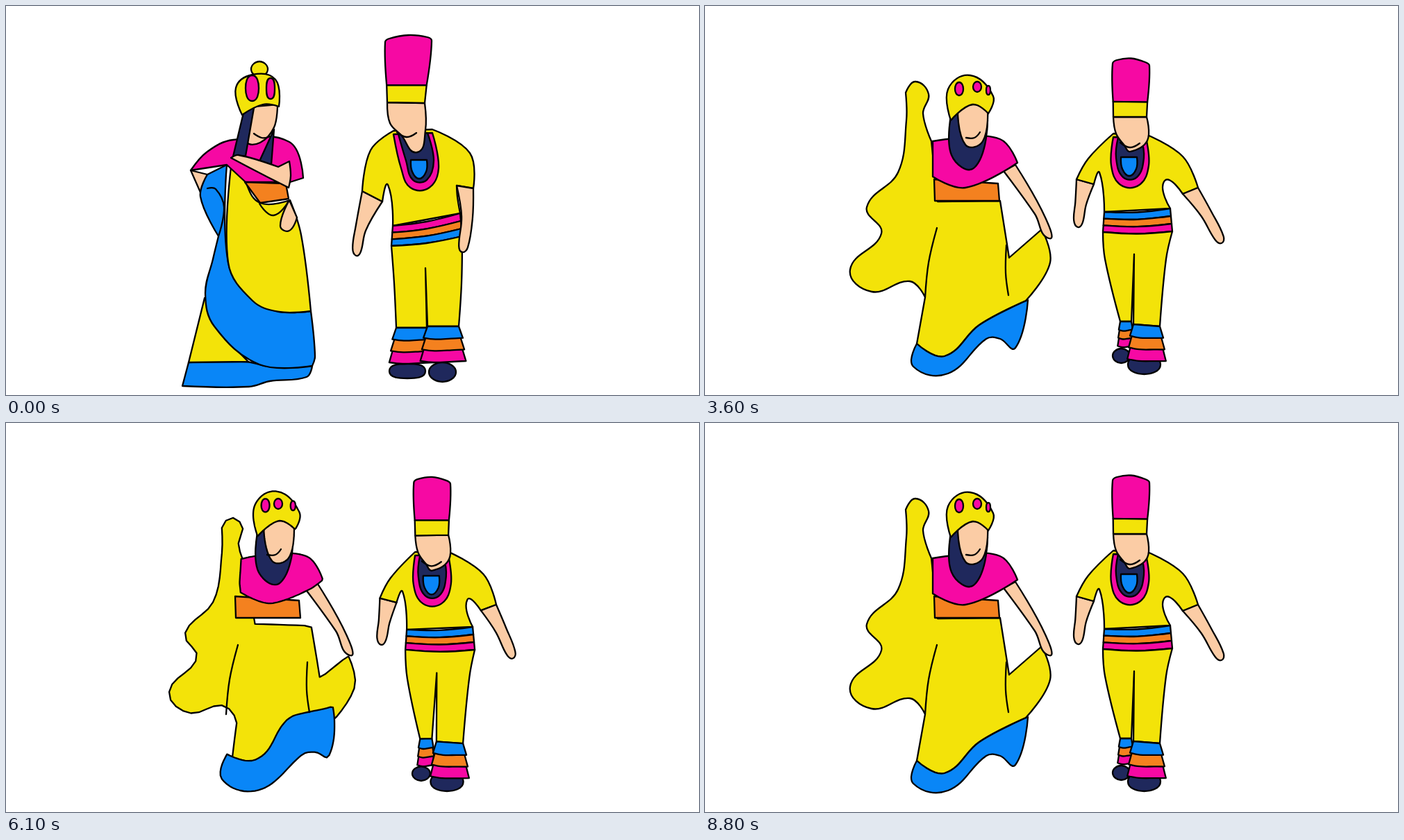
An HTML page that plays this animation: 998 by 561 pixels, repeating every 8900 ms.

```html
<!DOCTYPE html>
<html lang="en">
<head>
<meta charset="utf-8">
<title>Dancing couple</title>
<style>
html, body { margin: 0; width: 100%; height: 100%; overflow: hidden; background: #fff; }
svg { display: block; width: 100%; height: 100%; }
path { stroke: #000; stroke-width: 2.3; stroke-linejoin: round; stroke-linecap: round; }
</style>
</head>
<body>
<svg id="stage" viewBox="0 0 998 561"></svg>
<script>
// Gown parts: colour, then points. "x,y" is smooth, "x/y" a corner, two points span an oval.
const stand = {
  armL: 's 266/237 290/243 281/271',
  b2: 'b 263/514 345,513 380,520 441/519 433,535 380,541 350,549 254/548',
  y2: 'y 286/421 263/514 349/513 320,480',
  b1: 'b 318/229 320,370 355,424 395,441 439/440 445,505 441/519 365,517 300,462 287,415 298,365 306/332 280,275 290/243',
  fold: 'l 290,263 302,264 314,290 306,332',
  y1: 'y 326/217 343/229 345,253 366,284 409/280 425,330 439/440 393,441 355,425 320,370',
  shirt: 'm 266/237 290,210 327,193 408,196 428/248 409/254 345/254 318/229',
  belt: 'o 344/254 366/284 407/278 403/256',
  bow: 'l 365,285 385,302 406,283',
  face: 's 357/145 347,195 366,197 386,175 391/142',
  hair: 'n 343/150 327/217 345/216 357/147',
  lock: 'n 386/178 364/226 382/229',
  smile: 'l 357,184 368,190 378,189',
  ball: 'y 353,80 377,102',
  crown: 'y 340/157 331,118 355,99 388,106 393/145 370,142',
  winL: 'm 345,100 364,137',
  winR: 'm 375,104 387,134',
  hand: 's 408/280 395,317 408,324 419/305',
  arm: 's 324/219 335,215 392/232 408/224 410,245 407/262 360,238'
};
const swing = {
  legL: 's 328/462 322,525 290/557 330,550 345,500 357/468',
  legR: 's 388/497 374,548 398,552 407/505',
  b1: 'b 245/135 280,116 315,140 346/198 350/262 367/474 325,462 260,414 240,380 255,310 290,225 280,170',
  b2: 'b 543/345 554,410 530,515 445,541 405/508',
  y1: 'y 350/260 312,275 302,340 352,432 368,475 420,508 510,483 543,400 538/327 500,352 455/282 405,290',
  belt: 'o 346/247 400,255 449/245 452/280 400,291 370/284',
  shirt: 'm 346/198 380,181 440,181 483/204 455/243 390,256 347/247',
  hair: 'n 383/137 368,195 400,227 430,205 432/172 416,180 410,203 388,203 388/150',
  face: 's 390/128 440/124 433,170 415/180 414,192 384/190',
  smile: 'l 400,165 412,173 422,177',
  ball: 'y 395,60 419,84',
  crown: 'y 381/138 370,103 400,76 435,84 440/130 405,124',
  winL: 'm 387,82 406,108',
  winR: 'm 419,80 433,109',
  arm: 's 469/210 505,258 540,318 533,328 490,275 458/238'
};
const turn = {
  legL: 's 363/502 375,528 393,532 397/512',
  armL: 's 345/253 368/262 345,290 325,320 320,285',
  belt: 'o 369/258 386/258 388/278 370/275',
  b2: 'b 450/404 517,455 466/530 445,548 400,555 388,540 399/512 450,520 464,460',
  face: 's 400/146 460/148 455/178 393/170',
  shirt: 'm 384/180 355,205 340,243 390/263',
  sleeve: 'm 427/172 440,160 457/186 480,190 495/220 465/229',
  arm: 's 465/229 495/218 498,246 465/247',
  y1: 'y 427/172 460,200 466,280 503/358 505/432 452/404 465,470 440,523 345,495 320,525 262,495 265,437 290,388 320/370 352/288 385/278',
  fold: 'l 433,300 455,325 503,358',
  b1: 'b 382/170 405,156 427/170 415,260 430,355 505/432 450,404 405,340 385,240',
  b3: 'b 354/287 320,365 338,440 418/485 400,445 345,380 342,315',
  ball: 'y 436,62 458,83',
  crown: 'y 400/148 402,100 425,79 468,90 459/149 430,146',
  winL: 'm 407,90 416,112',
  winM: 'm 426,86 448,115',
  winR: 'm 459,95 468,118'
};
const sweep = {
  y1: 'y 360/231 330,250 314,360 289,430 340,462 360,530 405/550 510,555 545,525 530/423 551/417 538,375 540/346 508/336 495/291 395,275',
  gap: 'w 363/256 388/250 388/273 370/287',
  fold: 'l 361,235 368,300 372,382',
  b1: 'b 397/325 435,318 485,375 510,388 545/390 552/417 528/424 480,385 430,328',
  b2: 'b 402/385 435,430 536/478 545,530 510,556 408/550 480,538 519,515 490,475 430,450',
  hem: 'l 402,387 396,340 415,314 470,324 540,346',
  armL: 's 362/235 386/245 386/250 364/256',
  arm: 's 495/250 513/236 540,325 533,345 508,300',
  belt: 'o 391/255 490/255 494/290 440,286 388/273',
  shirt: 'm 425/182 380,202 365/232 450,258 521/231 485/185',
  face: 's 440/133 480/130 472,180 470,195 452/190',
  hair: 'n 430/137 423,182 465,236 482,180 474/168 468,212 447,175 438/133',
  smile: 'l 447,172 460,180 473,172',
  ball: 'y 440,61 461,80',
  crown: 'y 426/140 417,100 445,79 478,92 485/133 460,129',
  winL: 'm 429,91 438,116',
  winR: 'm 463,88 472,106',
  seam: 'l 654,367 665,410 667,460'
};
const wrap = {
  shirt: 'm 420/195 395/228 440/245 500/243 490,195',
  hair: 'n 421/145 417,195 440,213 462/180',
  face: 's 422/150 445,135 469/138 461,185 440,190',
  crown: 'y 421/152 414,115 445,89 478,125 475/143 450,135',
  winL: 'm 421,104 432,124',
  winR: 'm 443,95 458,113',
  y2: 'y 455/224 490,237 537/307 475,290',
  b1: 'b 316/368 318,285 365,235 425,232 475,295 450,365 392/440 380,417',
  y3: 'y 316/368 355,287 400,258 436,285 428,380 392/440 380,417',
  b2: 'b 433/232 447,219 485,290 545,312 590,380 575,465 515,518 430,518 388,460 450,365 476,310',
  y1: 'y 475/312 535,362 545,435 475,503 417,440 440,385'
};
const fling = {
  y1: 'y 289/125 303,109 322,127 314,155 326/195 335/282 425/281 438/363 485/322 497,370 462/425 395,460 345,505 305/487 317/420 295,397 240,412 209,380 254,328 233,290 278,240 290,165',
  b2: 'b 305/487 300,520 350,530 405,480 425,480 447,493 465/424 395,460 345,505',
  fold: 'l 334,320 322,370 317,420',
  hem: 'l 434,345 433,385 437,417',
  belt: 'o 330/250 422/256 424/281 331/281',
  arm: 's 430/238 447/229 490,305 495,335 475,300',
  shirt: 'm 328/195 360,191 425,192 450/226 375,262 328/246',
  hair: 'n 355/153 355,215 388,233 407/165',
  face: 's 364/148 385,142 407/147 400,195 375,200',
  smile: 'l 376,190 388,190 396,182',
  crown: 'y 354/165 350,120 382,100 415,130 408/155 385,142',
  winL: 'm 360,110 372,129',
  winM: 'm 386,109 398,124',
  winR: 'm 405,115 411,128'
};

// Joints of the man: head, sleeves, hands, hips and legs, shoes.
const joints = {
  stand: ['546,47 613,45 549,139 603,140 577,189 592,211 558,180 614,178 596,264',
    '525,208 513,267 542,282 550,258 668,212 673,263 649,259 650,275', '511,320 504,360 664,305 657,355',
    '557,317 654,299 559,400 656,400 604,378 562,464 606,464 607,462 652,462', '552,516 604,537 609,514 648,542'],
  swing: ['595,61 643,65 586,140 633,149 603,184 612,206 587,175 635,172 617,261',
    '548,210 533,249 552,264 567,257 695,205 720,246 697,254 667,243', '541,290 535,322 728,285 730,336',
    '570,303 669,292 571,365 675,370 620,380 585,459 616,458 626,458 671,459', '565,508 612,528 643,504 665,537'],
  turn: ['584,69 634,66 589,158 639,157 617,210 625,228 592,185 640,178 625,281',
    '555,235 537,272 563,282 580,258 700,205 727,246 702,257 677,240', '534,320 527,360 711,280 704,322',
    '583,307 680,297 590,375 684,370 632,360 598,462 633,462 637,460 657,460', '607,504 635,551 633,504 650,538'],
  sweep: ['600,95 655,97 605,186 653,185 630,226 645,247 605,203 655,190 645,300',
    '560,245 547,288 570,294 592,270 730,230 745,267 714,263 697,258', '557,335 561,377 714,295 709,336',
    '586,305 690,315 595,365 713,405 634,446 622,440 633,440 634,463 668,463', '615,468 638,497 651,512 683,556'],
  wrap: ['589,101 640,96 598,178 645,173 618,222 625,233 597,200 650,190 626,279',
    '565,250 562,271 580,272 592,263 684,225 678,262 655,266 680,275', '569,300 562,325 650,292 631,322',
    '592,303 687,308 590,390 690,380 636,377 584,460 609,456 640,461 680,463', '571,504 602,523 628,512 677,531'],
  fling: ['587,78 640,81 588,160 636,160 612,204 612,210 588,184 635,185 612,260',
    '552,220 535,250 560,257 568,240 688,217 710,262 688,271 662,252', '541,285 537,319 722,300 744,342',
    '575,297 670,292 576,365 664,365 618,358 598,455 614,455 617,459 655,462', '587,494 612,515 609,503 656,531']
};

const ink = { y: '#f3e309', m: '#f609a3', b: '#0986f7', o: '#f4811f', n: '#1f285c', s: '#fbcca5', w: '#fff', l: 'none' };
const SAMPLES = 96, STEP = 100, FRAMES = 89, INTRO = 11, CYCLE = 26;
const stage = document.getElementById('stage');
const ruler = document.createElementNS(stage.namespaceURI, 'path');
const fix = v => v.toFixed(1);
const mix = (a, b, k) => [a[0] + (b[0] - a[0]) * k, a[1] + (b[1] - a[1]) * k];
const move = (p, x, y) => [p[0] + x, p[1] + y];
const corner = p => [p[0], p[1], true];
const ink2path = (color, d) => `<path d="${d}" fill="${ink[color]}"/>`;

function unit(a, b) {
  const len = Math.hypot(b[0] - a[0], b[1] - a[1]) || 1;
  return [(b[0] - a[0]) / len, (b[1] - a[1]) / len];
}

// Smooth path through the points; corners get no tangent.
function curve(pts, open) {
  const n = pts.length, at = i => pts[(i + n) % n];
  const dir = i => at(i)[2] || (open && (i === 0 || i === n - 1)) ? [0, 0] : unit(at(i - 1), at(i + 1));
  let d = `M${fix(pts[0][0])} ${fix(pts[0][1])}`;
  for (let i = 0; i < (open ? n - 1 : n); i++) {
    const p = at(i), q = at(i + 1), u = dir(i), v = dir((i + 1) % n);
    const k = 0.37 * Math.hypot(q[0] - p[0], q[1] - p[1]);
    const stops = [p[0] + u[0] * k, p[1] + u[1] * k, q[0] - v[0] * k, q[1] - v[1] * k, q[0], q[1]];
    d += 'C' + stops.map(fix).join(' ');
  }
  return open ? d : d + 'Z';
}

function oval(a, b) {
  const x = (a[0] + b[0]) / 2, y = (a[1] + b[1]) / 2;
  return curve([[x, a[1]], [b[0], y], [x, b[1]], [a[0], y]]);
}

const points = text => text.split(' ').map(s => [...s.split(/[,\/]/).map(Number), s.includes('/')]);

function parse(parts) {
  const pose = new Map();
  for (const [name, text] of Object.entries(parts)) {
    const color = text[0], open = color === 'l', pts = points(text.slice(2));
    pose.set(name, { color, open, d: pts.length === 2 ? oval(...pts) : curve(pts, open) });
  }
  return pose;
}

// Evenly spaced points along a part, always wound the same way.
function samples(part) {
  if (part.pts) return part.pts;
  ruler.setAttribute('d', part.d);
  const total = ruler.getTotalLength(), pts = [];
  for (let i = 0; i < SAMPLES; i++) {
    const p = ruler.getPointAtLength(total * i / (part.open ? SAMPLES - 1 : SAMPLES));
    pts.push([p.x, p.y]);
  }
  const area = pts.reduce((sum, p, i) => {
    const q = pts[(i + 1) % SAMPLES];
    return sum + p[0] * q[1] - q[0] * p[1];
  }, 0);
  if (!part.open && area < 0) pts.reverse();
  return part.pts = pts;
}

function bestShift(a, b) {
  let best = 0, low = Infinity;
  for (let s = 0; s < SAMPLES; s++) {
    let sum = 0;
    for (let i = 0; i < SAMPLES; i += 3) {
      const q = b[(i + s) % SAMPLES];
      sum += (a[i][0] - q[0]) ** 2 + (a[i][1] - q[1]) ** 2;
    }
    if (sum < low) { low = sum; best = s; }
  }
  return best;
}

function morph(from, to, k) {
  const a = samples(from), b = samples(to), s = from.open ? 0 : bestShift(a, b);
  const line = a.map((p, i) => mix(p, b[(i + s) % SAMPLES], k).map(fix).join(' '));
  return 'M' + line.join('L') + (from.open ? '' : 'Z');
}

function woman(from, to, k) {
  let out = '';
  for (const [name, part] of k < 0.5 ? from : to) {
    const a = from.get(name), b = to.get(name);
    out += ink2path(part.color, k && a && b ? morph(a, b, k) : part.d);
  }
  return out;
}

function man(pts, belts) {
  const [tl, tr, fl, fr, chin, vee, sl, sr, low,
    elL, outL, inL, pitL, elR, outR, inR, pitR, midL, tipL, midR, tipR,
    hipL, hipR, kneeL, kneeR, fork, cuffL, cuffl, cuffr, cuffR, sa, sb, sc, sd] = pts;
  let out = '';
  const add = (color, ...p) => out += ink2path(color, curve(p, color === 'l'));
  const poly = (color, ...p) => add(color, ...p.map(corner));
  const limb = (a, b, mid, tip) => {
    const [ux, uy] = unit(b, a), end = unit(tip, mid);
    const palm = move(tip, end[0] * 8, end[1] * 8);
    add('s', corner(a), move(mid, ux * 8, uy * 8), move(palm, ux * 7, uy * 7), tip,
      move(palm, -ux * 6, -uy * 6), move(mid, -ux * 8, -uy * 8), corner(b));
  };
  const yoke = (color, inset) => {
    const side = 27 - inset, foot = low[1] - inset * 1.6;
    add(color, corner(move(sl, inset, 5)), [low[0] - side, foot - 30], [low[0] - side / 2, foot - 2],
      [low[0] + side / 2, foot - 2], [low[0] + side, foot - 30], corner(move(sr, -inset, 5)));
  };
  const frills = (a, b) => {
    const w = Math.hypot(b[0] - a[0], b[1] - a[1]), h = Math.min(50, w * 2.2) / 3;
    ['m', 'o', 'b'].forEach((color, i) => {
      const row = 2 - i, grow = w * 0.06 * row, flare = w * (0.13 + 0.05 * row);
      const l = move(a, -grow, h * row), r = move(b, grow, h * row);
      const bl = move(a, -flare, h * (row + 1)), br = move(b, flare, h * (row + 1));
      add(color, corner(l), corner(bl), move(mix(bl, br, 0.3), 0, 2), move(mix(bl, br, 0.7), 0, 1), corner(br), corner(r));
    });
  };

  limb(outL, inL, midL, tipL);
  add('y', corner(sl), elL, corner(outL), corner(inL), pitL, corner(hipL), corner(hipR),
    pitR, corner(inR), corner(outR), elR, corner(sr));
  yoke('m', 0);
  yoke('n', 7);
  const x = low[0] - 1, y = low[1] - 29;
  add('b', corner([x - 12, y - 13]), corner([x + 11, y - 13]), [x + 10, y + 4], [x, y + 14], [x - 10, y + 4]);

  const jawL = [fl[0] + 4, chin[1] - 20], jawR = [fr[0] + 1, chin[1] - 10];
  add('s', corner(fl), corner(fr), jawR, vee, move(chin, -8, -3), jawL);
  add('l', move(chin, -14, -7), chin, move(chin, 14, -6));
  const bl = mix(tl, fl, 0.73), br = mix(tr, fr, 0.73), top = move(mix(tl, tr, 0.5), 0, -4);
  add('m', corner(bl), move(tl, 0, 5), move(tl, 6, 0), top, move(tr, -6, 0), move(tr, 0, 5), corner(br));
  poly('y', bl, br, fr, fl);

  const waistL = move(hipL, -2, 29), waistR = move(hipR, 3, 33);
  [...belts].forEach((color, i) => {
    const a = i / 3, b = (i + 1) / 3;
    const l = mix(hipL, waistL, a), r = mix(hipR, waistR, a), l2 = mix(hipL, waistL, b), r2 = mix(hipR, waistR, b);
    add(color, corner(l), move(mix(l, r, 0.5), 0, 3), corner(r), corner(r2), move(mix(l2, r2, 0.5), 0, 3), corner(l2));
  });
  add('y', corner(waistL), move(mix(waistL, waistR, 0.5), 0, 3), corner(waistR), kneeR,
    corner(cuffR), corner(cuffr), corner(fork), corner(cuffl), corner(cuffL), kneeL);
  out += ink2path('n', oval(sa, sb)) + ink2path('n', oval(sc, sd));
  const legs = [[cuffL, cuffl], [cuffr, cuffR]].sort((a, b) => a[1][0] - a[0][0] - b[1][0] + b[0][0]);
  legs.forEach(leg => frills(...leg));
  limb(outR, inR, midR, tipR);
  return out;
}

const pose = (name, gown, belts) => ({ gown: parse(gown), body: points(joints[name].join(' ')), belts });
const A = pose('stand', stand, 'mob'), B = pose('swing', swing, 'mob'), C = pose('turn', turn, 'bom');
const D = pose('sweep', sweep, 'bom'), E = pose('wrap', wrap, 'bom'), F = pose('fling', fling, 'bom');
const intro = [[0, A], [12, B]];
const dance = [[12, B], [16, C], [22, D], [28, E], [36, F], [38, B]];

function picture(frame) {
  const opening = frame < INTRO, keys = opening ? intro : dance;
  const f = opening ? frame : (frame - 12 + CYCLE) % CYCLE + 12;
  const i = keys.findIndex((key, j) => f >= key[0] && f < keys[j + 1][0]);
  const [t0, from] = keys[i], [t1, to] = keys[i + 1];
  const k = (f - t0) / (t1 - t0);
  const body = from.body.map((p, j) => mix(p, to.body[j], k));
  return man(body, (k < 0.5 ? from : to).belts) + woman(from.gown, to.gown, k);
}

const cache = [];
let shown = -1;
function draw(now) {
  const frame = Math.floor(now / STEP) % FRAMES;
  if (frame === shown) return;
  stage.innerHTML = cache[frame] ??= picture(frame);
  shown = frame;
}

const start = performance.now();
function tick() {
  draw(performance.now() - start);
  requestAnimationFrame(tick);
}
tick();
</script>
</body>
</html>
```
